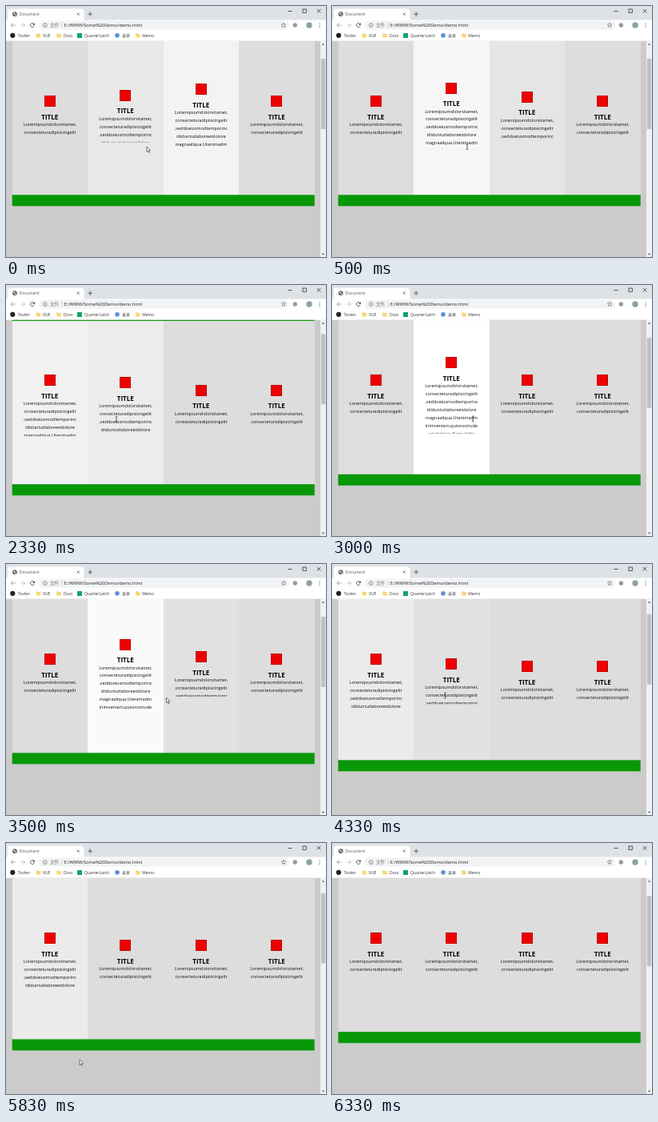
Write an HTML page with a canvas that moves like this. It is 400 px wide and 314 px high and loops after 6490 ms.

```html
<!DOCTYPE html>
<html lang="en">
<head>
<meta charset="utf-8">
<title>Document</title>
<style>
html, body { margin: 0; width: 100%; height: 100%; overflow: hidden; background: #ccc; }
canvas { display: block; width: 400px; height: 314px; }
</style>
</head>
<body>
<canvas id="stage" width="400" height="314"></canvas>
<script>
const ctx = document.getElementById('stage').getContext('2d');
const LOOP = 6490, STEP = 500 / 3;
const FONT = '"Open Sans", "Noto Sans CJK SC", "Noto Sans CJK", sans-serif';
const LINES = [
  'Loremipsumdolorsitamet,', 'consecteturadipisicingelit', ',seddoeiusmodtemporinc',
  'ididuntutlaboreetdolore', 'magnaaliqua.Utenimadm', 'inimveniam,quisnostrude',
  'xercitationullamcolabo'
];
const LEFT = 7.7, WIDTH = 94.5, GROW = 22;
const TEXT_TOP = 143.3, TEXT_HEIGHT = 20, LINE_HEIGHT = 9.9;
const GREEN = '#089808';

// While hovered a column opens at a steady rate, afterwards it closes at the same rate.
const RATE = .85 / 1000;
const visits = [
  { column: 2, enter: -1800, leave: -400 },
  { column: 1, enter: -380, leave: 690 },
  { column: 0, enter: 580, leave: 1850 },
  { column: 1, enter: 1820, leave: 3310 },
  { column: 2, enter: 3350, leave: 3700 },
  { column: 0, enter: 3850, leave: 5150 }
];

// Resting places of the pointer, with eased moves between them.
const pointerStops = [
  { time: 0, x: 176, y: 176 }, { time: 500, x: 169, y: 176 }, { time: 1170, x: 93.5, y: 163.5 },
  { time: 2330, x: 138, y: 168 }, { time: 3500, x: 200.5, y: 167 }, { time: 5170, x: 82, y: 162 },
  { time: 5830, x: 92, y: 271 }
];
const POINTER_GONE = 6100;

const clamp = v => Math.min(1, Math.max(0, v));
const smooth = v => v * v * (3 - 2 * v);

function openness(column, t) {
  const levels = visits.filter(v => v.column === column).map(({ enter, leave }) => {
    const peak = clamp((Math.min(t, leave) - enter) * RATE);
    return clamp(peak - Math.max(0, t - leave) * RATE);
  });
  return Math.max(0, ...levels);
}

function pointerAt(t) {
  const next = pointerStops.findIndex(stop => stop.time > t);
  if (next < 0) return pointerStops[pointerStops.length - 1];
  const a = pointerStops[next - 1], b = pointerStops[next];
  const p = smooth((t - a.time) / (b.time - a.time));
  return { x: a.x + (b.x - a.x) * p, y: a.y + (b.y - a.y) * p };
}

function rect(x, y, w, h, color) {
  ctx.fillStyle = color;
  ctx.fillRect(x, y, w, h);
}

function rounded(x, y, w, h, r, color) {
  ctx.fillStyle = color;
  ctx.beginPath();
  ctx.roundRect(x, y, w, h, r);
  ctx.fill();
}

function disc(x, y, r, color) {
  ctx.fillStyle = color;
  ctx.beginPath();
  ctx.arc(x, y, r, 0, 7);
  ctx.fill();
}

function ring(x, y, r, color, width, from = 0, to = 2 * Math.PI) {
  ctx.strokeStyle = color;
  ctx.lineWidth = width;
  ctx.beginPath();
  ctx.arc(x, y, r, from, to);
  ctx.stroke();
}

function trace(points) {
  ctx.beginPath();
  points.forEach(([x, y]) => ctx.lineTo(x, y));
}

function polyline(points, color, width = .8) {
  trace(points);
  ctx.strokeStyle = color;
  ctx.lineWidth = width;
  ctx.stroke();
}

function polygon(points, color) {
  trace(points);
  ctx.closePath();
  ctx.fillStyle = color;
  ctx.fill();
}

function label(text, x, y, size, color, align = 'left', weight = 400) {
  ctx.font = `${weight} ${size}px ${FONT}`;
  ctx.textAlign = align;
  ctx.fillStyle = color;
  ctx.fillText(text, x, y);
}

function clipTo(x, y, w, h, draw) {
  ctx.save();
  ctx.beginPath();
  ctx.rect(x, y, w, h);
  ctx.clip();
  draw();
  ctx.restore();
}

function cross(x, y, r, color) {
  polyline([[x - r, y - r], [x + r, y + r]], color);
  polyline([[x - r, y + r], [x + r, y - r]], color);
}

function arrow(x, y, dir, color) {
  polyline([[x - 2.8 * dir, y], [x + 2.8 * dir, y]], color);
  polyline([[x, y - 2.7], [x + 2.8 * dir, y], [x, y + 2.7]], color);
}

function folder(x) {
  rounded(x - 2.7, 34.4, 2.8, 2, .5, '#edc55c');
  rounded(x - 2.7, 35, 5.4, 4.4, .5, '#f8d775');
}

function drawTabs() {
  rect(0, 0, 400, 18, '#dee1e6');
  rounded(2, 3.5, 95.5, 15, [4, 4, 0, 0], '#fff');
  disc(11, 10.2, 2.9, '#5f6368');
  polygon([[9.3, 9.2], [10.8, 8.3], [11.3, 9.8], [10.2, 10.8]], '#fff');
  polygon([[11.4, 11], [13, 10.3], [12.2, 12.2], [11.2, 12.3]], '#fff');
  label('Document', 16.7, 12.1, 5.1, '#555');
  cross(90.3, 10.2, 1.5, '#555');
  polyline([[102.3, 10.2], [108, 10.2]], '#444');
  polyline([[105.2, 7.4], [105.2, 13]], '#444');
  polyline([[352.5, 6.5], [357.5, 6.5]], '#333');
  ctx.strokeRect(371, 4, 4.3, 4.3);
  cross(391, 6.2, 2.3, '#333');
}

function drawToolbar() {
  rect(0, 17.5, 400, 26, '#fff');
  arrow(9, 24, -1, '#999');
  arrow(21, 24, 1, '#bbb');
  ring(33, 24, 2.5, '#555', .9, .4, 5.5);
  polygon([[36, 20.9], [36, 24], [33, 23.8]], '#555');

  rounded(41, 18.5, 313, 11, 5.5, '#f1f3f4');
  ring(48.8, 24, 2.5, '#666', .6);
  rect(48.5, 23.6, .7, 1.9, '#666');
  rect(48.5, 22.3, .7, .7, '#666');
  label('文件', 55, 26, 5.6, '#777');
  rect(69.8, 21, .6, 6, '#bbb');
  label('E:/WWW/Some%20Demo/demo.html', 72.8, 26, 5.65, '#222');

  const star = Array.from({ length: 11 }, (_, i) => {
    const r = i % 2 ? 1.3 : 3, a = i * Math.PI / 5 - Math.PI / 2;
    return [347 + r * Math.cos(a), 24 + r * Math.sin(a)];
  });
  polyline(star, '#666', .6);
  disc(361.3, 24, 2.7, '#999');
  disc(379, 24, 3.7, '#8ba4a0');
  for (let i = -1; i <= 1; i++) disc(392, 24 + 2.2 * i, .6, '#555');
}

function drawBookmarks() {
  disc(8.3, 36.8, 3.1, '#222');
  label('Tovlen', 14.8, 38.7, 5, '#333');
  folder(40.5);
  label('VUE', 46, 38.7, 5, '#333');
  folder(66);
  label('Docs', 72, 38.7, 5, '#333');
  rect(89, 34, 6, 6, '#13a465');
  label('QuarterLatch', 98, 38.7, 5, '#333');
  disc(139, 36.8, 2.8, '#5d8fd8');
  label('禾亭', 145, 38.7, 5, '#333');
  folder(165);
  label('Memo', 170.3, 38.7, 5, '#333');
}

function drawColumn(index, amount, shift) {
  const x = LEFT + index * WIDTH, center = x + WIDTH / 2;
  const start = Math.round(x), end = Math.round(x + WIDTH);
  const dy = shift - GROW * amount;
  const shade = Math.round(221 + 34 * amount);
  rect(start, 32 + shift, end - start, 204.5, `rgb(${shade},${shade},${shade})`);

  const boxX = Math.round(center - 7), boxY = Math.round(112 + dy);
  rect(boxX, boxY, 14, 14, '#c40000');
  rect(boxX + 1, boxY + 1, 12, 12, '#ee0000');
  label('TITLE', center - .2, 141.5 + dy, 8, '#000', 'center', 700);

  clipTo(start, TEXT_TOP + dy, WIDTH, TEXT_HEIGHT + 2 * GROW * amount, () => {
    LINES.forEach((line, i) => label(line, center, 150 + dy + i * LINE_HEIGHT, 5.5, '#111', 'center'));
  });
}

function drawScrollbar(shift) {
  rect(393, 43.5, 7, 271, '#f1f1f1');
  rect(393.8, 66 - shift * .36, 5.4, 88, '#c1c1c1');
  polygon([[394.8, 48.8], [398.2, 48.8], [396.5, 46.8]], '#555');
  polygon([[394.8, 309.8], [398.2, 309.8], [396.5, 311.8]], '#555');
}

function drawPage(amounts, shift) {
  clipTo(0, 43.5, 400, 271, () => {
    rect(0, 43, 400, 271, '#cbcbcb');
    rect(LEFT, 18 + shift, 4 * WIDTH, 14, GREEN);
    amounts.forEach((amount, i) => drawColumn(i, amount, shift));
    rect(LEFT, 236.3 + shift, 4 * WIDTH, 14, GREEN);
    drawScrollbar(shift);
  });
}

function drawPointer({ x, y }, amounts, shift) {
  const index = Math.floor((x - LEFT) / WIDTH);
  const center = LEFT + (index + .5) * WIDTH;
  const top = TEXT_TOP + shift - GROW * amounts[index];
  const bottom = top + TEXT_HEIGHT + 2 * GROW * amounts[index];
  if (Math.abs(x - center) < 34 && y > top && y < bottom) {
    polyline([[x, y - 3.2], [x, y + 3.2]], '#222', .7);
    for (const end of [y - 3.3, y + 3.3]) polyline([[x - 1.4, end], [x + 1.4, end]], '#222', .6);
    return;
  }
  const shape = [[0, 0], [0, 6.6], [1.5, 5.2], [2.5, 7.5], [3.5, 7], [2.5, 4.8], [4.5, 4.7], [0, 0]]
    .map(([dx, dy]) => [x + dx, y + dy]);
  polygon(shape, '#fff');
  polyline(shape, '#222', .6);
}

function render() {
  const now = performance.now() % LOOP;
  const t = Math.floor((now + 4) / STEP) * STEP;
  const amounts = [0, 1, 2, 3].map(column => openness(column, t));
  // The first column stays put on screen, so its growth pushes the rest down.
  const shift = GROW * amounts[0];
  drawPage(amounts, shift);
  drawTabs();
  drawToolbar();
  drawBookmarks();
  if (t < POINTER_GONE) drawPointer(pointerAt(t), amounts, shift);
  requestAnimationFrame(render);
}
render();
</script>
</body>
</html>
```
